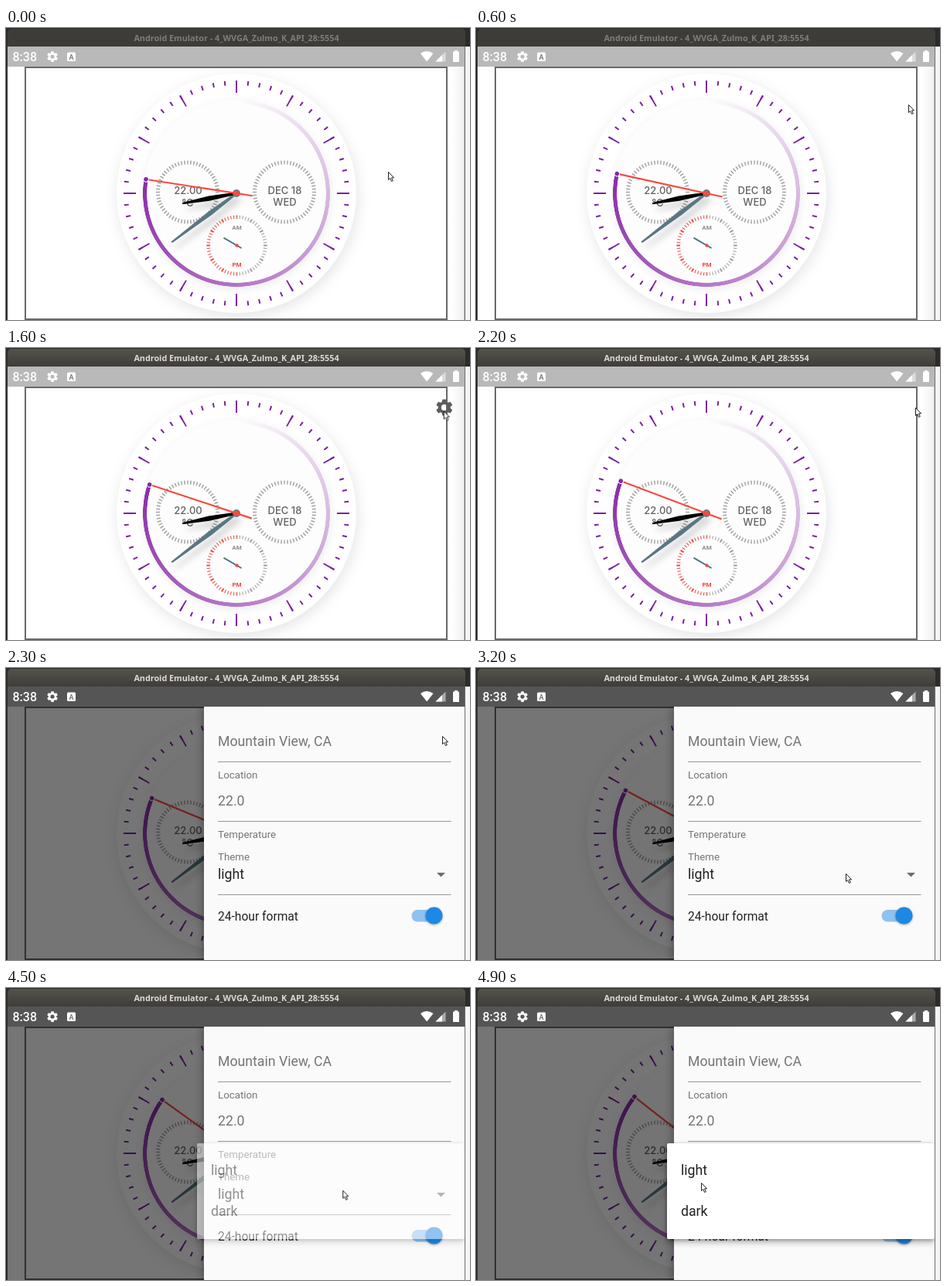
Write an HTML page that moves like this. It is 600 by 378 pixels and loops after 5 s.

```html
<!DOCTYPE html>
<html lang="en">
<head>
<meta charset="utf-8">
<title>Clock face</title>
<style>
@property --a { syntax: "<angle>"; inherits: true; initial-value: 278.8deg; }
html, body { margin: 0; width: 100%; height: 100%; overflow: hidden; background: #2b2b29; }
#stage { position: relative; width: 600px; height: 378px; overflow: hidden; }
#stage > *, #clock > * { position: absolute; }
svg { left: 0; top: 0; display: block; }
text { font-family: Roboto, sans-serif; }

/* every animation shares one 5 s loop */
#clock, .loop { animation: 5s -1ms infinite step-end both; }

#beyond { left: 594px; top: 24px; width: 6px; height: 354px; background: #f5f5f5; }
#window { left: 2px; top: 24px; width: 592px; height: 354px;
  background: linear-gradient(90deg, #fff 574px, #f1f1f1 590px, #8a8a8a 591px, #555); }
#title { left: 2px; top: 1px; width: 592px; height: 23px; border-radius: 5px 5px 0 0;
  font: bold 10.8px/23px "Noto Sans", "Open Sans", sans-serif; text-align: center;
  background: #3d3c38; color: #807d78; animation-name: focus; }
@keyframes focus {
  16%, 100% { background: linear-gradient(#55534b, #3e3d39); color: #dfdbd2; }
}
#bar { left: 2px; top: 24px; width: 591px; height: 26px; background: #b9b9b9; }
#frame { left: 24px; top: 50px; width: 543px; height: 324px; border: 2px solid #696969; }

#clock { inset: 0; animation-name: seconds; }
@keyframes seconds {
  0% { --a: 278.8deg; animation-timing-function: steps(20); }
  40% { --a: 290.7deg; animation-timing-function: step-end; }
  46% { --a: 292.6deg; animation-timing-function: steps(27); }
  100% { --a: 308.8deg; }
}
#sweep { left: 176px; top: 92px; width: 244px; height: 244px;
  background: conic-gradient(#8a2ba600, #8a2ba6 var(--a), #8a2ba600 var(--a));
  mask: radial-gradient(circle, #0000 115.5px, #000 116.1px 120.6px, #0000 121.2px); }
.disc { fill: #fff; filter: drop-shadow(2px 5px 9px rgba(0, 0, 0, .1)); }
.inner { fill: #fdfdfd; filter: drop-shadow(1px 3px 6px rgba(0, 0, 0, .08)); }
.ring { fill: none; }
.info { font: 500 13px Inter, sans-serif; fill: #616161; text-anchor: middle; }
.half { font: bold 8px Roboto, sans-serif; text-anchor: middle; }
.hands { filter: drop-shadow(5px 7px 4px rgba(0, 0, 0, .22)); }
#second { transform: rotate(var(--a)); }

#cog { animation-name: cog; }
@keyframes cog {
  0%, 40%, 100% { visibility: hidden; }
  18% { visibility: visible; }
}
#scrim { left: 2px; top: 24px; width: 591px; height: 354px; background: rgba(0, 0, 0, .54); }
#drawer { left: 256px; top: 50px; width: 337px; height: 328px; background: #fafafa;
  box-shadow: -2px 0 10px rgba(0, 0, 0, .3); clip-path: inset(0 0 0 -16px); }
#scrim, #drawer, #form { animation-name: open; }
@keyframes open {
  0% { visibility: hidden; }
  46%, 100% { visibility: visible; }
}
.big { font-size: 17.7px; fill: #212121; }
.hint { font-size: 17.7px; fill: #757575; }
.label { font-size: 13.3px; fill: #757575; }

#menu { left: 247px; top: 201px; width: 346px; height: 124px; background: #fff; border-radius: 2px;
  box-shadow: 0 4px 9px rgba(0, 0, 0, .3), 0 1px 4px rgba(0, 0, 0, .25);
  clip-path: inset(-10px 0 -16px -12px); animation-name: menu; }
#menu span { position: absolute; left: 18px; font: 17.7px/22px Roboto, sans-serif; color: #212121; }
@keyframes menu {
  0% { opacity: 0; }
  90% { opacity: .5; }
  92%, 100% { opacity: 1; }
}

#pointer { animation-name: move; }
@keyframes move {
  0% { transform: translate(494px, 186px); animation-timing-function: steps(4); }
  8% { transform: translate(546px, 118px); animation-timing-function: steps(2); }
  12% { transform: translate(559px, 99px); animation-timing-function: steps(3); }
  18%, 26% { transform: translate(562px, 95px); animation-timing-function: steps(4); }
  34% { transform: translate(567px, 77px); animation-timing-function: steps(4); }
  42%, 44% { transform: translate(568px, 77px); animation-timing-function: step-end; }
  46% { transform: translate(564px, 88px); animation-timing-function: step-end; }
  48% { transform: translate(552px, 98px); animation-timing-function: steps(4); }
  56% { transform: translate(486px, 238px); animation-timing-function: steps(3); }
  62%, 88% { transform: translate(478px, 266px); animation-timing-function: steps(4); }
  96% { transform: translate(307px, 249px); animation-timing-function: step-end; }
  98%, 100% { transform: translate(291px, 252px); }
}
</style>
</head>
<body>
<div id="stage">
  <div id="beyond"></div>
  <div id="window"></div>
  <div id="title" class="loop">Android Emulator - 4_WVGA_Zulmo_K_API_28:5554</div>
  <div id="bar"></div>
  <div id="frame"></div>

  <div id="clock">
    <svg width="600" height="378">
      <defs>
        <path id="gear" d="M19.14 12.94a7.5 7.5 0 0 0 0-1.88l2.03-1.58a.5.5 0 0 0 .12-.61l-1.92-3.32a.5.5 0 0 0-.59-.22l-2.39.96a7 7 0 0 0-1.62-.94l-.36-2.54a.5.5 0 0 0-.48-.41h-3.84a.5.5 0 0 0-.47.41l-.36 2.54a7 7 0 0 0-1.62.94l-2.39-.96a.5.5 0 0 0-.59.22L2.74 8.87a.5.5 0 0 0 .12.61l2.03 1.58a7.500 7.500 0 0 0 0 1.880l-2.030 1.580a.5.5 0 0 0-.12.610l1.920 3.320a.5.5 0 0 0 .59.220l2.390-.96a7 7 0 0 0 1.620.940l.36 2.540a.5.5 0 0 0 .48.410h3.840a.5.5 0 0 0 .47-.41l.36-2.540a7 7 0 0 0 1.620-.94l2.390.960a.5.5 0 0 0 .59-.22l1.920-3.320a.5.5 0 0 0-.12-.610zM12 15.600a3.600 3.600 0 1 1 0-7.200 3.600 3.600 0 0 1 0 7.200z"/>
        <circle id="scale" class="ring" r="38.500" pathLength="360" stroke="#a3a3a3" stroke-width="5" stroke-dasharray="2.2 3.8" stroke-dashoffset="1.1"/>
        <g id="halfScale" class="ring" stroke-width="4.500">
          <path d="M0 36.800A36.800 36.800 0 0 1 0-36.800" pathLength="180" stroke-dasharray="1.6 4.4" stroke-dashoffset=".8"/>
          <path d="M0 36.800A36.800 36.800 0 0 1 0-36.800" pathLength="180" stroke-dasharray="3 27" stroke-dashoffset="1.5"/>
        </g>
      </defs>
      <g transform="translate(298 214)">
        <circle class="disc" r="155"/>
        <circle class="inner" r="121"/>
        <g class="ring" stroke="#7b1fa2">
          <circle r="138" pathLength="360" stroke-width="16" stroke-dasharray=".8 29.2" stroke-dashoffset=".4"/>
          <circle r="143" pathLength="360" stroke-width="6" stroke-dasharray=".8 5.2" stroke-dashoffset=".4"/>
        </g>
      </g>
      <use href="#scale" x="235" y="212.5"/>
      <use href="#scale" x="360" y="212.5"/>
      <g class="info">
        <text class="info" x="235.500" y="215">22.00</text>
        <text class="info" x="235" y="230.500">°C</text>
        <text class="info" x="360.500" y="214.500">DEC 18</text>
        <text class="info" x="360.500" y="230">WED</text>
      </g>
      <g transform="translate(298.5 281.5)">
        <use href="#halfScale" stroke="#ef4f46"/>
        <use href="#halfScale" stroke="#9e9e9e" transform="rotate(180)"/>
        <text class="half" y="-20.500" fill="#8a8a8a">AM</text>
        <text class="half" y="27.500" fill="#f0433a">PM</text>
        <path d="M-17-9.800L6 3.500" stroke="#4f7380" stroke-width="2"/>
        <circle r="2.200" fill="#f44f45"/>
      </g>
    </svg>

    <div id="sweep"></div>

    <svg width="600" height="378">
      <g transform="translate(298 214)">
        <g class="hands">
          <path d="M-1.500 0L-3-42L-1.200-105H1.200L3-42L1.500 0z" fill="#5a7683" transform="rotate(232.9)"/>
          <path d="M-1.500 0L-3.200-36L-1.200-71H1.200L3.200-36L1.500 0z" fill="#000" transform="rotate(259.4)"/>
        </g>
        <circle r="5" fill="#5f7a87"/>
        <g id="second">
          <path d="M0 21V-116" stroke="#f9493f" stroke-width="2.200"/>
          <circle cy="-118.4" r="3.300" fill="#8427a6" stroke="#fff"/>
        </g>
        <circle r="3.400" fill="#f9493f"/>
      </g>
    </svg>
  </div>

  <svg id="cog" class="loop" width="600" height="378">
    <use href="#gear" fill="#5c5c5c" transform="translate(553.6 63.8) scale(1.1)"/>
  </svg>
  <div id="scrim" class="loop"></div>

  <svg width="600" height="378" fill="#fff">
    <text x="8.500" y="43" font-size="16" font-weight="500">8:38</text>
    <use href="#gear" transform="translate(51.4 28.4) scale(.72)"/>
    <rect x="79" y="31.500" width="11" height="11.500" rx="1.500"/>
    <text x="84.500" y="40.500" font-size="9" font-weight="bold" fill="#777" text-anchor="middle">A</text>
    <path d="M536 33Q544 27 552.500 33L544.200 43.500z"/>
    <path d="M568.500 30.500V43.500H555.500z" opacity=".5"/>
    <path d="M564 35V43.500H555.500z"/>
    <path d="M580 29h4v1.500h1.300q.7 0 .7.700v12.100q0 .7-.7.700h-6.600q-.7 0-.7-.7v-12.100q0-.7.700-.7h1.300z"/>
  </svg>

  <div id="drawer" class="loop"></div>
  <svg id="form" class="loop" width="600" height="378">
    <text class="hint" x="274" y="100.500">Mountain View, CA</text>
    <text class="label" x="274" y="143">Location</text>
    <text class="hint" x="274" y="178">22.0</text>
    <text class="label" x="274" y="220">Temperature</text>
    <text class="label" x="274" y="249">Theme</text>
    <text class="big" x="274" y="273">light</text>
    <text x="274" y="326.500" font-size="15.6" fill="#212121">24-hour format</text>
    <path d="M274 121.500H575.500M274 198.500H575.500M274 293.500H575.500" stroke="#979797"/>
    <path d="M557 265H568L562.500 270.500z" fill="#6b6b6b"/>
    <rect x="524.500" y="313" width="37" height="15.500" rx="7.750" fill="#8ec2f1"/>
    <circle cx="553.500" cy="320.500" r="11" fill="#1e88e5" style="filter: drop-shadow(0 1px 1.5px rgba(0, 0, 0, .35))"/>
  </svg>

  <div id="menu" class="loop">
    <span style="top: 24px">light</span>
    <span style="top: 77px">dark</span>
  </div>

  <svg width="600" height="378">
    <path id="pointer" class="loop" d="M.5.5V10.500L2.800 8.500L4.500 12.500L6.300 11.700L4.600 7.800H7.600z" fill="#fff" stroke="#222"/>
  </svg>
</div>
</body>
</html>
```
